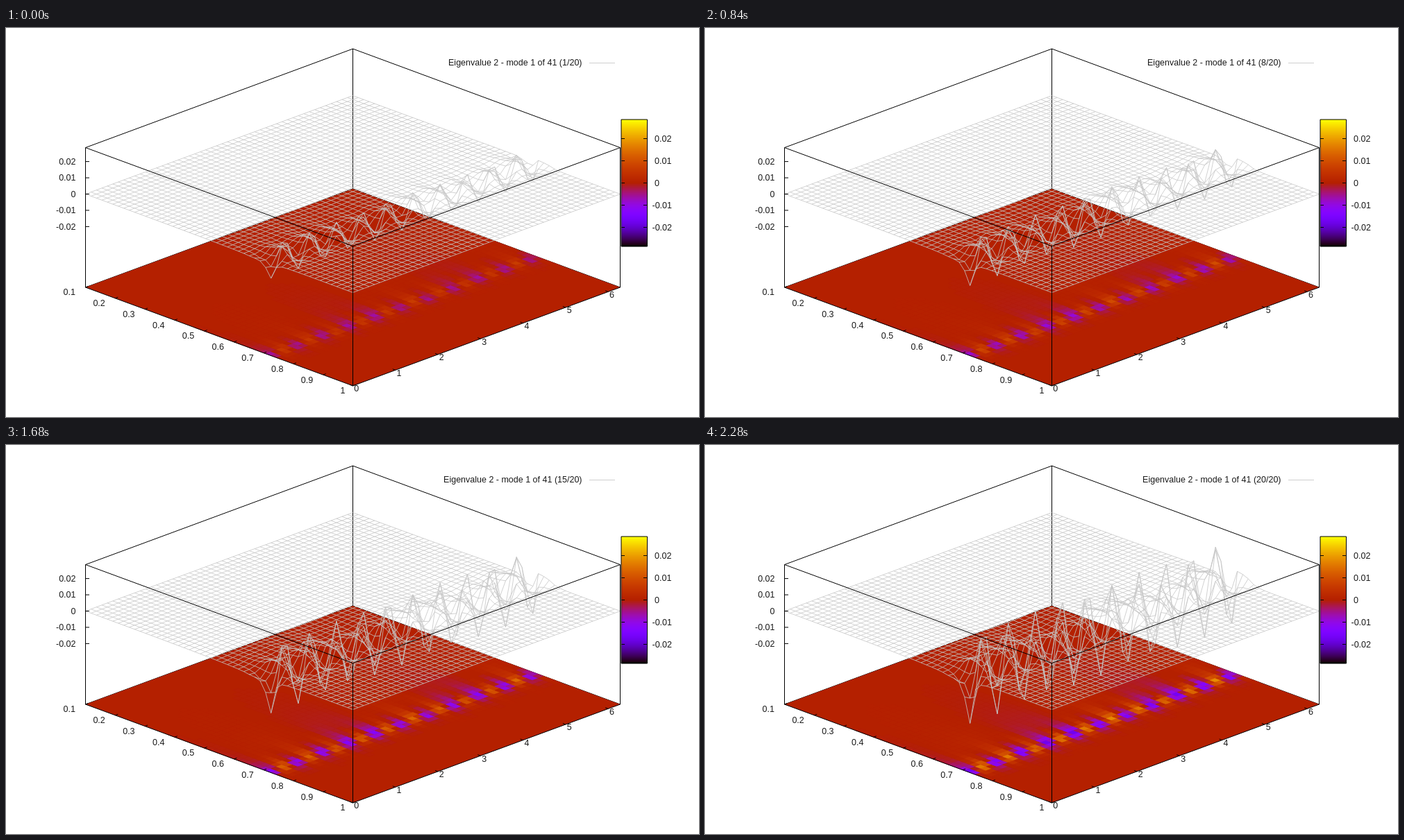
An HTML page with a canvas that plays this animation: 998x561 px, repeating every 2.4 s.

```html
<!DOCTYPE html>
<html lang="en">
<head>
<meta charset="utf-8">
<title>Eigenmode</title>
<style>
  html, body { margin: 0; width: 100%; height: 100%; overflow: hidden; background: #fff; }
  canvas { display: block; }
</style>
</head>
<body>
<canvas id="stage" width="998" height="561"></canvas>
<script>
const ctx = document.getElementById('stage').getContext('2d');
const CELLS = 49, RIDGE = 34, STEPS = 20, STEP_MS = 120;
const DX = 385 / CELLS, DY = 142 / CELLS;
const LEFT = 114.5, MID = 499.5, RIGHT = 884.5;
const HALF = 67; // pixels from zero to the end of the value range
const TICKS = [0.02, 0.01, 0, -0.01, -0.02];

// i runs along the radius, j along the angle
const px = (i, j) => LEFT + DX * (i + j);
const py = (i, j, level) => level + DY * (i - j);
const wave = (j, period) => -Math.cos(2 * Math.PI * j / period);

// Repeatable value from -1 to 1 for each grid point
function jitter(i, j) {
  const s = Math.sin(i * 127.1 + j * 311.7) * 43758.5453;
  return 2 * (s - Math.floor(s)) - 1;
}

function height(i, j, amp) {
  const d = RIDGE - i;
  const lag = 0.8 * Math.tanh(d);
  const uneven = d ? 1 + 0.45 * jitter(i, j) : 1;
  const ridge = Math.exp(d >= 0 ? -0.6 * d : 1.1 * d) * uneven * wave(j - 0.15 - lag, 4.75);
  const tail = d > 0 ? 0.13 * Math.exp(-0.13 * d) * wave(j - 17.5, 20) : 0;
  return amp * (ridge + tail);
}

function palette(g) {
  g = Math.min(1, Math.max(0, g));
  const rgb = [Math.sqrt(g), g ** 3, Math.max(0, Math.sin(2 * Math.PI * g))];
  return `rgb(${rgb.map(v => Math.round(v * 255))})`;
}

function trace(points) {
  ctx.beginPath();
  for (const [x, y] of points) ctx.lineTo(x, y);
}

function line(...points) {
  trace(points);
  ctx.stroke();
}

function label(text, x, y, align) {
  ctx.textAlign = align;
  ctx.fillText(text, x, y);
}

function drawFloor(z) {
  ctx.fillStyle = palette(0.5);
  trace([[LEFT, 374], [MID, 232], [RIGHT, 374], [MID, 516]]);
  ctx.fill();
  ctx.lineWidth = 0.6;
  for (let i = 0; i < CELLS; i++) {
    for (let j = 0; j < CELLS; j++) {
      const mean = (z[i][j] + z[i + 1][j] + z[i][j + 1] + z[i + 1][j + 1]) / 4;
      if (Math.abs(mean) < 0.3) continue;
      ctx.fillStyle = ctx.strokeStyle = palette(0.5 + mean / (2 * HALF));
      const corners = [[i, j], [i + 1, j], [i + 1, j + 1], [i, j + 1]];
      trace(corners.map(([a, b]) => [px(a, b), py(a, b, 374)]));
      ctx.closePath();
      ctx.fill();
      ctx.stroke();
    }
  }
}

function drawMesh(z) {
  const at = (i, j) => [px(i, j), py(i, j, 239.5) - z[i][j]];
  const indices = z.map((_, n) => n);
  ctx.lineWidth = 0.8;
  ctx.lineJoin = 'bevel';
  ctx.strokeStyle = '#c6c6c6';
  for (const a of indices) {
    line(...indices.map(b => at(a, b)));
    line(...indices.map(b => at(b, a)));
  }
}

function drawBackFrame() {
  ctx.lineWidth = 1;
  ctx.strokeStyle = '#000';
  line([LEFT, 172.5], [MID, 30], [RIGHT, 172.5]);
  line([MID, 30], [MID, 232]);
  line([LEFT, 374], [MID, 232], [RIGHT, 374]);
}

function drawFrontFrame() {
  ctx.lineWidth = 1;
  ctx.strokeStyle = '#000';
  line([LEFT, 374], [LEFT, 172.5], [MID, 314.5], [RIGHT, 172.5], [RIGHT, 374], [MID, 516], [LEFT, 374]);
  line([MID, 314.5], [MID, 516]);
}

function drawAxes() {
  ctx.fillStyle = '#1a1a1a';
  for (const v of TICKS) {
    const y = 239.5 - v * 2345;
    line([LEFT, y], [LEFT + 5.5, y]);
    label(v, 100.5, y + 4.2, 'right');
  }
  for (let n = 1; n <= 10; n++) {
    const s = (n - 1) / 9, x = LEFT + 385 * s, y = 374 + 142 * s;
    line([x, y], [x + 4, y - 1.5]);
    label(n / 10, x - 14.5, y + 11.3, n < 10 ? 'right' : 'center');
  }
  for (let n = 0; n <= 6; n++) {
    const s = n / (2 * Math.PI), x = MID + 385 * s, y = 516 - 142 * s;
    line([x, y], [x - 4, y - 1.5]);
    label(n, x + 5.3, y + 8.3, 'center');
  }
}

function drawColorBar() {
  for (let n = 0; n < 183; n++) {
    ctx.fillStyle = palette(1 - n / 182);
    ctx.fillRect(886, 132 + n, 38, 1);
  }
  ctx.strokeRect(886, 132, 37.5, 183);
  ctx.fillStyle = '#1a1a1a';
  for (const v of TICKS) {
    const y = 223.5 - v * 3200;
    line([886, y], [891, y]);
    line([918, y], [923.5, y]);
    label(v, v < 0 ? 930.5 : 934, y + 4.4, 'left');
  }
}

function drawLegend(step) {
  label(`Eigenvalue 2 - mode 1 of 41 (${step}/${STEPS})`, 829.5, 54, 'right');
  ctx.strokeStyle = '#cfcfcf';
  line([840, 50.5], [877, 50.5]);
}

function draw(step) {
  const amp = 23.4 * Math.exp(0.0535 * (step - 1));
  const z = Array.from({ length: CELLS + 1 }, (_, i) =>
    Array.from({ length: CELLS + 1 }, (_, j) => height(i, j, amp)));
  ctx.fillStyle = '#fff';
  ctx.fillRect(0, 0, 998, 561);
  ctx.font = '12.5px "Liberation Sans", Arial, sans-serif';
  drawBackFrame();
  drawFloor(z);
  drawMesh(z);
  drawFrontFrame();
  drawAxes();
  drawColorBar();
  drawLegend(step);
}

let shown = 0;
function tick() {
  const step = Math.floor(performance.now() / STEP_MS) % STEPS + 1;
  if (step !== shown) draw(shown = step);
  requestAnimationFrame(tick);
}
tick();
</script>
</body>
</html>
```
